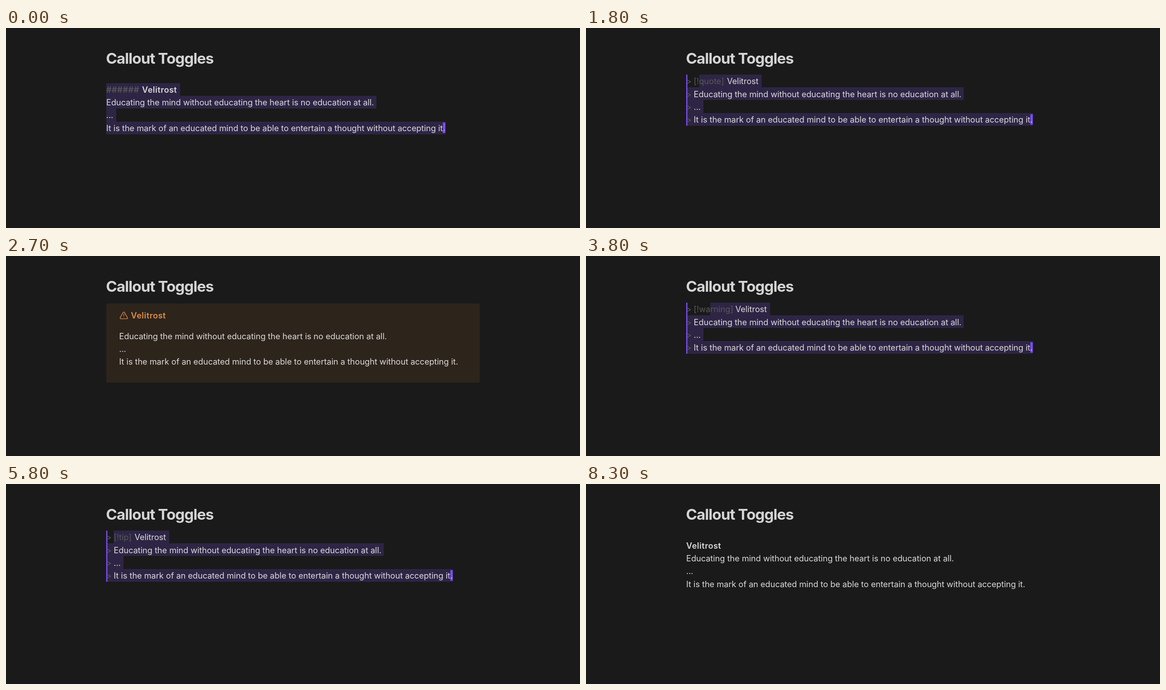
An HTML page for the animation above (8.4 s loop, 1266x442 px).

```html
<!DOCTYPE html>
<html lang="en">
<head>
<meta charset="utf-8">
<title>Callout Toggles</title>
<style>
  html, body { margin: 0; width: 100%; height: 100%; overflow: hidden; background: #1a1a1a; }
  svg { display: block; width: 100vw; height: 100vh; }
  text {
    font: 400 18.2px Inter, "Open Sans", sans-serif;
    font-optical-sizing: none;
    letter-spacing: -.055px;
    fill: #dadada;
    white-space: pre;
  }
  .title { font-size: 33.2px; font-weight: 700; letter-spacing: -1px; fill: #d4d4d4; }
  .bold { font-weight: 600; letter-spacing: .45px; }
  .mark { fill: #585858; }
</style>
</head>
<body>
<svg viewBox="0 0 1266 442">
  <rect width="1266" height="442" fill="#1a1a1a"/>
  <text class="title" x="220.5" y="79">Callout Toggles</text>
  <g id="note"></g>
</svg>
<script>
const LOOP = 8400;
const PITCH = 28.2;
const ACCENT = '#7a4df2';
const NAME = 'Velitrost';
const LINES = [
  'Educating the mind without educating the heart is no education at all.',
  '...',
  'It is the mark of an educated mind to be able to entertain a thought without accepting it'
];

const KINDS = {
  quote: {
    color: '#9e9e9e', nameX: 311,
    icon: 'M3 21c3 0 7-1 7-8V5c0-1.25-.76-2-2-2H4c-1.25 0-2 .75-2 2v6c0 1.25.75 2 2 2 1 0 1 0 1 1v1c0 1-1 2-2 2s-1 0-1 1v2c0 1 0 1 1 1z' +
      'M15 21c3 0 7-1 7-8V5c0-1.25-.76-2-2-2h-4c-1.25 0-2 .75-2 2v6c0 1.25.75 2 2 2h.75c0 2.25.25 4-2.75 4v3c0 1 0 1 1 1z'
  },
  warning: {
    color: '#dd8f47', fill: '#2d241c', nameX: 329.5,
    icon: 'm21.73 18-8-14a2 2 0 0 0-3.48 0l-8 14A2 2 0 0 0 4 21h16a2 2 0 0 0 1.73-3ZM12 9v4M12 17h.01'
  },
  tip: {
    color: '#53dfdd', fill: '#1f2b2b', nameX: 283.5,
    icon: 'M8.5 14.5A2.5 2.5 0 0 0 11 12c0-1.38-.5-2-1-3-1.07-2.14-.22-4.05 2-6 .5 2.5 2 4.9 4 6.5 2 1.6 3 3.5 3 5.5a7 7 0 1 1-14 0c0-1.15.43-2.29 1-3a2.5 2.5 0 0 0 2.5 2.5z'
  }
};

const rect = (x, y, x2, y2, fill, rx = 0) =>
  `<rect x="${x}" y="${y}" width="${x2 - x}" height="${y2 - y}" rx="${rx}" fill="${fill}"/>`;
const text = (x, y, str, cls = '') => `<text class="${cls}" x="${x}" y="${y}">${str}</text>`;

function body(x, y, dot = '#dadada') {
  return LINES.map((line, i) => {
    const end = i === 2 ? `<tspan fill="${dot}">.</tspan>` : '';
    return text(x, y + i * PITCH, line + end);
  }).join('');
}

// One block per line, given its left and right edges.
const selection = (y, spans) => spans.map(([a, b], i) =>
  rect(a, Math.round(y + i * PITCH), b, Math.round(y + (i + 1) * PITCH), '#2e2545')).join('');

const caret = (x, y) => rect(x, y, x + 5.5, y + 23, ACCENT);

function heading() {
  return selection(122, [[221, 384], [221, 817], [221, 243], [221, 969.5]]) +
    caret(963.5, 209) +
    text(221, 143, '######', 'bold mark') +
    text(300, 143, NAME, 'bold') +
    body(221, 171.2, '#c3b2ff');
}

function plain(blink) {
  return (blink ? caret(963.5, 209) : '') +
    text(221, 143, NAME, 'bold') + body(221, 171.2);
}

function source(kind, selX) {
  const { nameX } = KINDS[kind];
  let out = selection(103, [[selX, nameX + 76.5], [223, 833], [223, 259], [223, 985.5]]) +
    rect(221, 103, 223.6, 216, ACCENT) + caret(980, 190.5);
  for (let i = 0; i < 4; i++) out += text(221, 124.3 + i * PITCH, '&gt;', 'mark');
  return out + text(237.5, 124.3, `[!${kind}]`, 'mark') +
    text(nameX, 124.3, NAME) + body(237.5, 152.5);
}

function callout(kind) {
  const { color, fill, icon } = KINDS[kind];
  return (fill ? rect(221, 105, 1045, 280, fill, 4) : '') +
    `<path transform="translate(250 121.4) scale(.82)" d="${icon}" fill="none" stroke="${color}"
      stroke-width="1.75" stroke-linecap="round" stroke-linejoin="round"/>` +
    text(275.5, 138, `<tspan fill="${color}">${NAME}</tspan>`, 'bold') +
    body(249.5, 183.9);
}

const steps = [
  [0, heading],
  [300, () => source('quote', 237.5)],
  [600, () => callout('quote')],
  [1800, () => source('quote', 250)],
  [2100, heading],
  [2400, () => source('warning', 237.5)],
  [2700, () => callout('warning')],
  [3800, () => source('warning', 274)],
  [4200, heading],
  [4500, () => source('tip', 237.5)],
  [4800, () => callout('tip')],
  [5800, () => source('tip', 237.5)],
  [6100, heading],
  [6500, () => plain(true)],
  [7100, () => plain(false)],
  [7700, () => plain(true)],
  [8300, () => plain(false)]
];

const note = document.getElementById('note');
let shown;

function draw(time) {
  const t = time % LOOP;
  const step = steps.findLast(s => s[0] <= t);
  if (step !== shown) {
    note.innerHTML = step[1]();
    shown = step;
  }
}

const start = performance.now();
function tick() {
  draw(performance.now() - start);
  requestAnimationFrame(tick);
}
tick();
</script>
</body>
</html>
```
